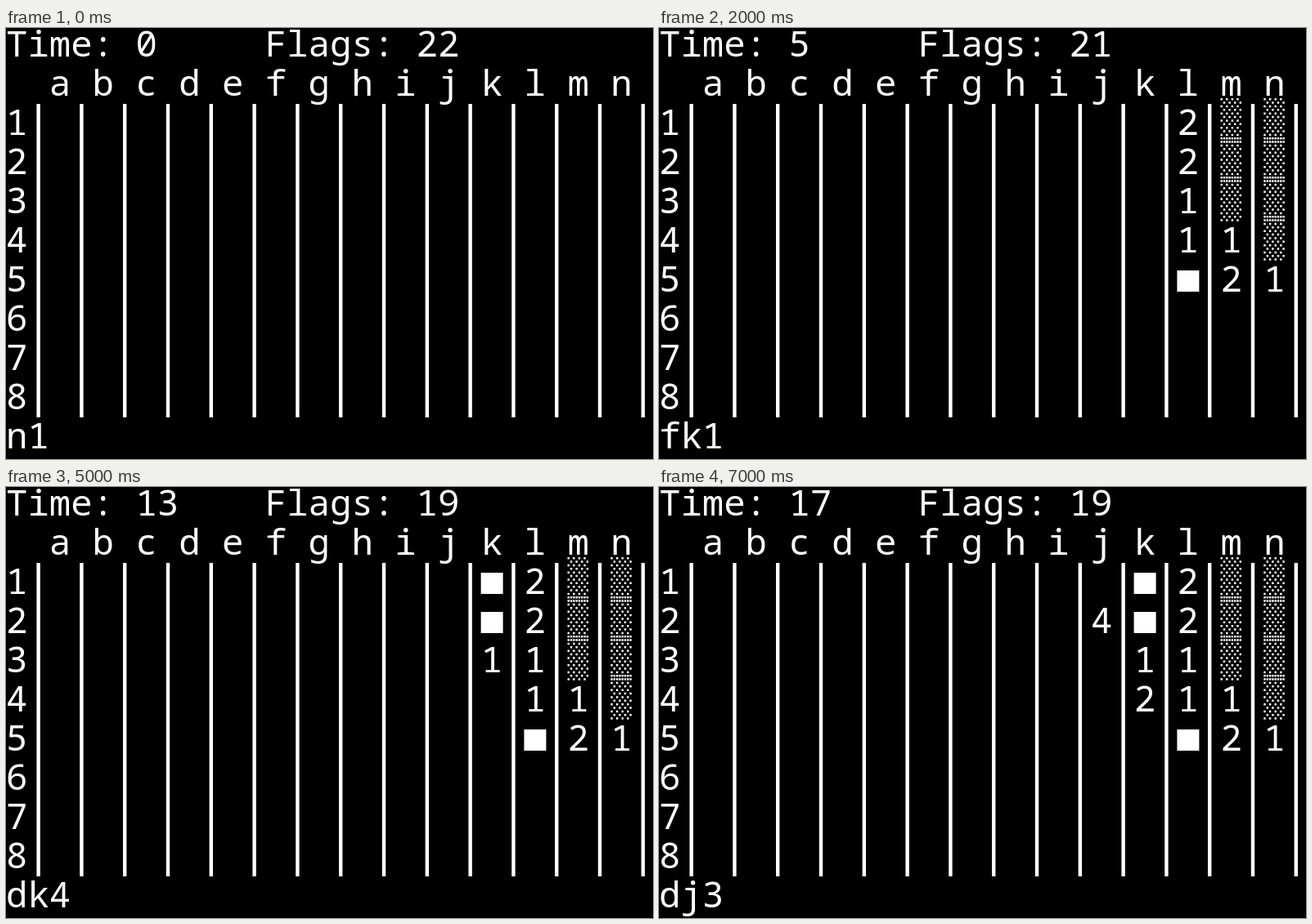
An HTML page for the animation above (8 s loop, 791x528 px).

```html
<!DOCTYPE html>
<html lang="en">
<head>
<meta charset="utf-8">
<title>Minesweeper in a terminal</title>
<style>
html, body { margin: 0; width: 100%; height: 100%; overflow: hidden; background: #000; }
svg { display: block; width: 791px; height: 528px; fill: #fff; }
text { font: 400 44px "Noto Sans Mono", "DejaVu Sans Mono", monospace; white-space: pre; font-variant-ligatures: none; }
</style>
</head>
<body>
<svg id="stage" viewBox="0 0 791 528"></svg>
<script>
const CW = 26.4, LH = 48, BASE = 35, COLS = 'abcdefghijklmn', ROWS = 8, STEP = 1000;

// One entry per second: clock, flags left, typed command.
const steps = [
  [0, 22, 'n1'], [1, 22, 'fl5'], [5, 21, 'fk1'], [9, 20, 'fk2'],
  [11, 19, 'dk3'], [13, 19, 'dk4'], [15, 19, 'dj2'], [17, 19, 'dj3']
];

// Cells uncovered or flagged at each step: '.' is empty, '#' is a flag.
const moves = [
  '', 'l12 l22 l31 l41 m41 m52 n51 m1. m2. m3. n1. n2. n3. n4.',
  'l5#', 'k1#', 'k2#', 'k31', 'k42', 'j24'
];

const stage = document.getElementById('stage');

function add(tag, attrs, text = '') {
  const el = document.createElementNS('http://www.w3.org/2000/svg', tag);
  for (const key in attrs) el.setAttribute(key, attrs[key]);
  el.textContent = text;
  return stage.appendChild(el);
}

const write = (col, row, text) => add('text', { x: col * CW, y: BASE + row * LH }, text);

// Staggered dots; the cell is taller than a line, so neighbours overlap.
function shadePath(x, y) {
  let d = '';
  for (let r = 0; r < 13; r++)
    for (let c = 0; c < 4; c++)
      d += `M${x + c * 6.6 + (r % 2) * 3.3} ${y + r * LH / 11}h2.4v2.5h-2.4z`;
  return d;
}

function addCell([name, row, value]) {
  const col = 2 + 2 * COLS.indexOf(name), x = col * CW, y = row * LH;
  if (value === '.') return add('path', { d: shadePath(x + 0.1, y + 38) });
  if (value === '#') return add('rect', { x: x - 0.2, y: y + 57, width: 27, height: 26 });
  return write(col, +row + 1, value);
}

const clock = write(0, 0), flags = write(12, 0), command = write(0, 10);
write(2, 1, [...COLS].join(' '));
for (let r = 1; r <= ROWS; r++) write(0, r + 1, r);
for (let c = 0; c <= COLS.length; c++)
  add('rect', { x: (2 * c + 1.5) * CW - 2.2, y: 93, width: 4.4, height: ROWS * LH });

const cells = moves.map(m => m.split(' ').filter(Boolean).map(addCell));

let shown = -1;
function draw(now) {
  const i = Math.floor(now / STEP) % steps.length;
  if (i !== shown) {
    shown = i;
    const [time, left, typed] = steps[i];
    clock.textContent = 'Time: ' + time;
    flags.textContent = 'Flags: ' + left;
    command.textContent = typed;
    cells.forEach((group, n) => group.forEach(el => { el.style.display = n <= i ? '' : 'none'; }));
  }
}

const start = performance.now();
function tick() {
  draw(performance.now() - start);
  requestAnimationFrame(tick);
}
tick();
</script>
</body>
</html>
```
